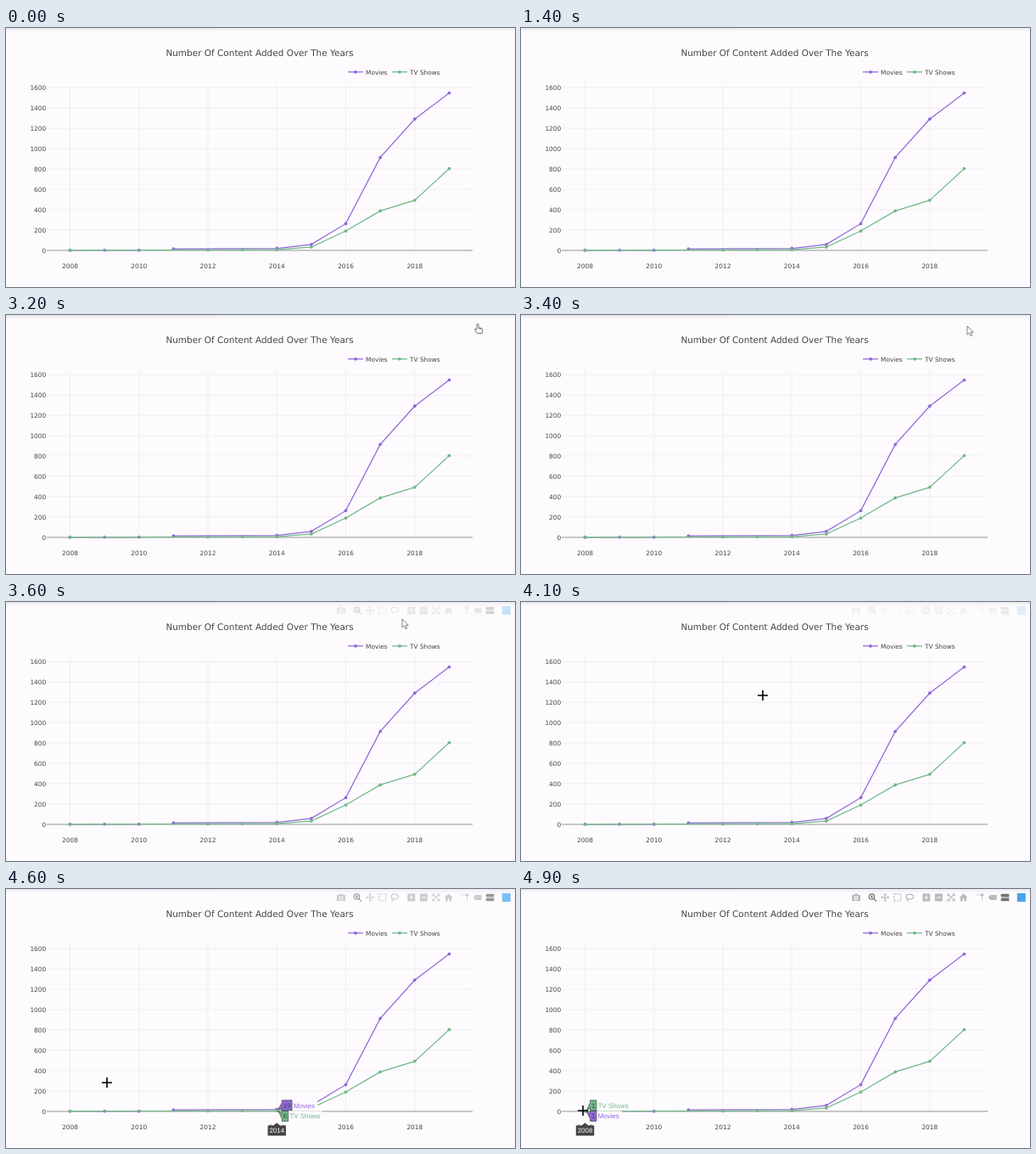
Animation, 600 px wide and 305 px high, one loop 5 s. Source, as an HTML page:

```html
<!DOCTYPE html>
<html lang="en">
<head>
<meta charset="utf-8">
<title>Content added over the years</title>
<style>
  html, body { margin: 0; width: 100%; height: 100%; overflow: hidden; background: #fdfbfe; }
  svg { display: block; width: 100vw; height: 100vh; }
  text { font: 7.4px "DejaVu Sans", sans-serif; fill: #444; text-rendering: geometricPrecision; }
  #title { font-size: 10.47px; }
  #hover text { font: 7.9px "Liberation Sans", sans-serif; }
  .icon { fill: none; stroke: #444; stroke-width: 1.2; opacity: .36; }
  .icon .solid { fill: #444; stroke: none; }
  .icon .cut { stroke: #fdfbfe; }
  .active { opacity: .75; }
</style>
</head>
<body>
<svg viewBox="0 0 600 305" xmlns="http://www.w3.org/2000/svg">
  <defs>
    <linearGradient id="shade" x1="0" y1="0" x2="0" y2="1">
      <stop offset="0" stop-color="#ecebee"/>
      <stop offset="1" stop-color="#fdfbfe"/>
    </linearGradient>
  </defs>
  <rect width="600" height="305" fill="#fdfbfe"/>
  <rect width="600" height="5" fill="url(#shade)"/>
  <rect width="248" height="1.5" fill="#e6e5e8" opacity=".6"/>
  <g id="chart"></g>
  <text id="title" x="299" y="33.2" text-anchor="middle">Number Of Content Added Over The Years</text>
  <g id="hover"></g>
  <g id="bar"></g>
  <path id="arrow" d="M0 0V10.2L2.4 8L4.1 11.8L5.8 11L4.1 7.4H7.2Z" fill="#fff" stroke="#666" stroke-width=".8"/>
  <path id="hand" d="M-1 1Q0-.6 1 1V5L4.6 5.6Q6 6 5.8 8L5 11.5H-.5L-3.4 7.4Q-3.4 6-2.2 6.4L-1 7.4Z M2 5V7M3.8 5.5V7.2" fill="#fff" stroke="#555" stroke-width=".8"/>
  <path id="cross" d="M-6 0H6M0-6V6" stroke="#000" stroke-width="1.6"/>
</svg>
<script>
const LOOP = 5000, STEP = 100;
const el = id => document.getElementById(id);
const px = year => 75.5 + (year - 2008) * 40.63;
const py = value => 261.8 - value * 0.1198;

// Each run of years is one unbroken line
const series = {
  'Movies': { color: '#9168d8', runs: [{ 2008: 1, 2009: 2, 2010: 1 }, { 2011: 13, 2014: 19, 2015: 58, 2016: 262, 2017: 913, 2018: 1290, 2019: 1546 }] },
  'TV Shows': { color: '#70b886', runs: [{ 2008: 1, 2012: 3, 2013: 6, 2014: 6, 2015: 32, 2016: 190, 2017: 387, 2018: 492, 2019: 803 }] }
};

const line = (x1, y1, x2, y2, color, width = 1) =>
  `<path d="M${x1} ${y1}L${x2} ${y2}" stroke="${color}" stroke-width="${width}"/>`;
const dot = (x, y, color) => `<circle cx="${x}" cy="${y}" r="1.9" fill="${color}"/>`;
const label = (x, y, text, anchor = 'start', fill = '#444') =>
  `<text x="${x}" y="${y}" text-anchor="${anchor}" style="fill:${fill}">${text}</text>`;

function plot(run, color) {
  const pts = Object.entries(run).map(([year, v]) => [px(year), py(v)]);
  return `<polyline points="${pts.join(' ')}" fill="none" stroke="${color}" stroke-width="1.25"/>` +
    pts.map(([x, y]) => dot(x, y, color)).join('');
}

function chart() {
  let out = '';
  for (let year = 2008; year <= 2018; year += 2) {
    out += line(px(year), 65, px(year), 262, '#f0eef1') + label(px(year), 282.8, year, 'middle');
  }
  for (let v = 0; v <= 1600; v += 200) {
    out += line(48, py(v), 550, py(v), v ? '#f0eef1' : '#aaa8ac', v ? 1 : 1.2) + label(47.2, py(v) + 2.7, v, 'end');
  }
  Object.entries(series).forEach(([name, { color, runs }], i) => {
    const x = 403 + i * 52;
    out += runs.map(run => plot(run, color)).join('') +
      line(x, 51.8, x + 18, 51.8, color, 1.25) + dot(x + 9, 51.8, color) + label(x + 21, 54.5, name);
  });
  return out;
}

// Value flag pointing at the data point, with the series name beside it
function flag(year, name, mid) {
  const { color, runs } = series[name], v = Object.assign({}, ...runs)[year];
  const x = px(year), left = x + 6, right = left + 3 + String(v).length * 4.4;
  return `<rect x="${right}" y="${mid - 6}" width="${name.length * 5}" height="12" fill="#fdfbfe"/>` +
    `<path d="M${x + 1.5} ${py(v)}L${left} ${mid + 3}V${mid + 6}H${right}V${mid - 6}H${left}V${mid - 3}Z" fill="${color}" stroke="#444" stroke-width=".7"/>` +
    label((left + right) / 2, mid + 2.8, v, 'middle') +
    label(right + 1.8, mid + 2.8, name, 'start', color);
}

function hover(year) {
  const x = px(year), names = Object.keys(series);
  if (year === 2008) names.reverse();
  return names.map((name, i) => flag(year, name, 254.8 + i * 12.6)).join('') +
    `<path d="M${x} 275.3l3.5 3.2h7.2v12h-21.4v-12h7.2Z" fill="#444"/>` +
    label(x, 287.2, year, 'middle', '#fff');
}

function modebar() {
  const stroke = d => `<path d="${d}"/>`;
  const dashed = d => `<path d="${d}" stroke-dasharray="2 1.1"/>`;
  const solid = d => `<path class="solid" d="${d}"/>`;
  const cut = d => `<path class="cut" d="${d}"/>`;
  const icon = body => `<g class="icon">${body}</g>`;
  const active = body => `<g class="icon active">${body}</g>`;
  const tile = solid('M-4.5-4.5h9v9h-9Z');
  const groups = [
    [icon(solid('M-5-3H-2.5L-1.5-4.2H1.5L2.5-3H5V4H-5Z') + '<circle class="cut" r="1.9" cy=".4"/>')],
    [
      active('<circle r="3.2" cx="-1" cy="-1"/>' + stroke('M1.4 1.4L4.6 4.6M-2.5-1H.5M-1-2.5V.5')),
      icon(stroke('M-4 0H4M0-4V4') + solid('M-5 0l2-2v4ZM5 0l-2-2v4ZM0-5l-2 2h4ZM0 5l-2-2h4Z')),
      icon(dashed('M-4-4H4V4H-4Z')),
      icon('<ellipse rx="4.3" ry="2.9" cy="-1"/>' + stroke('M-3 1Q-4 3-1.5 4.5'))
    ],
    [
      icon(tile + cut('M-2.5 0H2.5M0-2.5V2.5')),
      icon(tile + cut('M-2.5 0H2.5')),
      icon(stroke('M-3-3L3 3M3-3L-3 3M-4-1.5V-4H-1.5M1.5-4H4V-1.5M4 1.5V4H1.5M-1.5 4H-4V1.5')),
      icon(solid('M0-4.5L5 0H3.5V4.5H1V1.5H-1V4.5H-3.5V0H-5Z'))
    ],
    [
      icon(dashed('M-4-3H2.5V4.5') + solid('M1-4.5h3v3h-3Z')),
      icon(solid('M-5 0L-2.5-3H5V3H-2.5Z')),
      active(solid('M-5-2.4L-3.8-4.2H5V-.6H-3.8ZM-5 2.4L-3.8.6H5V4.2H-3.8Z'))
    ],
    ['<rect x="-5" y="-5" width="10" height="10" fill="#4aa3ec"/>']
  ];
  let x = 395, out = '';
  for (const group of groups) {
    for (const body of group) {
      out += `<g transform="translate(${x} 10)">${body}</g>`;
      x += 14.6;
    }
    x += 4.9;
  }
  return out;
}

const ramp = (t, from, to) => Math.min(1, Math.max(0, (t - from) / (to - from)));
const easeOut = u => 1 - (1 - u) ** 1.55;
const easeIn = u => u ** 1.55;
const smooth = u => u * u * (3 - 2 * u);

// Pointer trips: each starts where the one before ended
const home = [224, 33];
const trips = [
  { from: 1800, to: 2300, end: [195, 18], ease: easeOut },
  { from: 2400, to: 2700, end: [556, 10], ease: smooth },
  { from: 3200, to: 3600, end: [467, 20], ease: easeIn },
  { from: 3600, to: 3800, end: [373, 47], ease: easeOut },
  { from: 3900, to: 4900, end: [73, 261], ease: easeOut }
];

const pointer = t => trips.reduce((pos, { from, to, end, ease }) => {
  const k = ease(ramp(t, from, to));
  return pos.map((v, i) => v + (end[i] - v) * k);
}, home);

const barOpacity = t => Math.max(
  .45 * ramp(t, 3400, 3700) * (1 - ramp(t, 3900, 4200)),
  ramp(t, 4350, 4700)
);
const hoverYear = t => t >= 4700 ? 2008 : t >= 4200 ? 2014 : 0;
const cursor = t => t < 1800 ? '' : t >= 3800 ? 'cross' : t >= 2700 && t < 3400 ? 'hand' : 'arrow';

let shownYear = 0;
function draw(time) {
  const t = Math.floor(time % LOOP / STEP) * STEP;
  const [x, y] = pointer(t).map(Math.round), kind = cursor(t), year = hoverYear(t);
  for (const id of ['arrow', 'hand', 'cross']) {
    el(id).setAttribute('visibility', id === kind ? 'visible' : 'hidden');
    el(id).setAttribute('transform', `translate(${x} ${y})`);
  }
  el('bar').setAttribute('opacity', barOpacity(t));
  if (year !== shownYear) {
    el('hover').innerHTML = year ? hover(year) : '';
    shownYear = year;
  }
}

el('chart').innerHTML = chart();
el('bar').innerHTML = modebar();
const start = performance.now();
function tick() {
  draw(performance.now() - start);
  requestAnimationFrame(tick);
}
tick();
</script>
</body>
</html>
```
